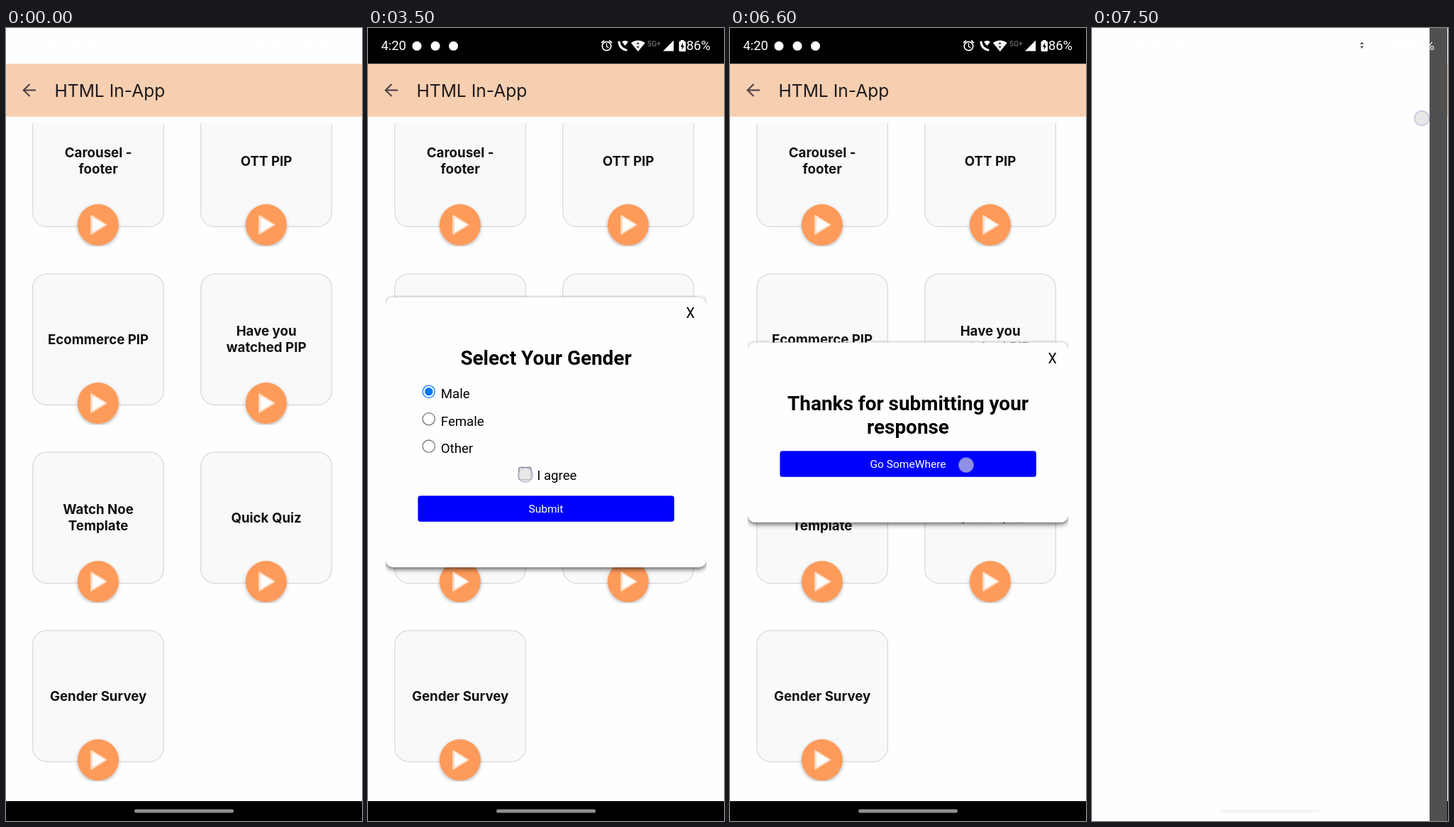
Write an HTML page with a canvas that moves like this. It is 502 by 1116 pixels and loops after 7.6 s.

```html
<!DOCTYPE html>
<html lang="en">
<head>
<meta charset="utf-8">
<title>HTML In-App</title>
<style>
html, body { margin: 0; width: 100%; height: 100%; overflow: hidden; background: #fefefe; }
canvas { display: block; width: 502px; height: 1116px; }
</style>
</head>
<body>
<canvas id="stage" width="502" height="1116"></canvas>
<script>
const ctx = document.getElementById('stage').getContext('2d');
const W = 502, H = 1116, LOOP = 7600, STEP = 100;
const PAPER = '#fefefe', ORANGE = '#fe9b5a', BLUE = '#0000fe', ACCENT = '#0075ff';
const UI = 'Inter, sans-serif', WEB = 'Roboto, sans-serif';

const cards = [
  ['Carousel -', 'footer'], ['OTT PIP'],
  ['Ecommerce PIP'], ['Have you', 'watched PIP'],
  ['Watch Noe', 'Template'], ['Quick Quiz'],
  ['Gender Survey']
];

// Each tap: start, end, x, y
const taps = [
  [400, 700, 129, 1031], [2400, 2700, 88, 514], [3400, 3800, 222, 629],
  [4800, 5000, 279, 684], [6600, 6800, 333, 615], [7500, 7600, 465, 127]
];

const between = (t, a, b) => t >= a && t < b;

function rect(x, y, w, h, color) {
  ctx.fillStyle = color;
  ctx.fillRect(x, y, w, h);
}

function round(x, y, w, h, r, fill, stroke, width = 1.3) {
  ctx.beginPath();
  ctx.roundRect(x, y, w, h, r);
  paint(fill, stroke, width);
}

function circle(x, y, r, fill, stroke, width = 1.3) {
  ctx.beginPath();
  ctx.arc(x, y, r, 0, Math.PI * 2);
  paint(fill, stroke, width);
}

function poly(points, fill, stroke, width, closed = true) {
  ctx.beginPath();
  points.forEach(([x, y]) => ctx.lineTo(x, y));
  if (closed) ctx.closePath();
  paint(fill, stroke, width);
}

function paint(fill, stroke, width) {
  if (fill) {
    ctx.fillStyle = fill;
    ctx.fill();
  }
  if (stroke) {
    ctx.strokeStyle = stroke;
    ctx.lineWidth = width;
    ctx.stroke();
  }
}

function text(value, x, y, font, color = '#000', align = 'left') {
  ctx.font = font;
  ctx.fillStyle = color;
  ctx.textAlign = align;
  ctx.fillText(value, x, y);
}

function shadow(color, blur, dy) {
  ctx.shadowColor = color;
  ctx.shadowBlur = blur;
  ctx.shadowOffsetY = dy;
}

function clipped(x, y, w, h, draw) {
  ctx.save();
  ctx.beginPath();
  ctx.rect(x, y, w, h);
  ctx.clip();
  draw();
  ctx.restore();
}

function playButton(x, y) {
  clipped(x - 34, y - 34, 68, 64.5, () => {
    shadow('rgba(0,0,0,.28)', 5, 2);
    circle(x, y, 29, ORANGE);
  });
  ctx.lineJoin = 'round';
  poly([[x - 9.5, y - 12.5], [x - 9.5, y + 12.5], [x + 11, y]], '#fddcc5', '#fddcc5', 2.6);
  poly([[x - 7.2, y - 9.8], [x - 7.2, y + 9.4], [x + 8.8, y - 0.2]], '#fff', '#fff', 1);
}

function card(lines, i) {
  const x = 37.7 + (i % 2) * 237, y = 94 + Math.floor(i / 2) * 251;
  const cx = x + 92.4;
  round(x, y + 0.9, 184.7, 184.6, 20, '#f9f9f9', '#dadada');
  lines.forEach((line, n) => {
    const offset = (n - (lines.length - 1) / 2) * 23;
    text(line, cx, y + 99.8 + offset, `700 18.7px ${UI}`, '#111', 'center');
  });
  playButton(cx - 0.2, y + 183);
}

function page(offset) {
  ctx.save();
  ctx.translate(offset, 0);
  rect(0, 0, W, H, PAPER);
  rect(0, 50.3, W, 74.5, '#f6cfb0');
  ctx.lineCap = 'butt';
  ctx.lineJoin = 'miter';
  poly([[33.5, 79], [24.8, 87.5], [33.5, 96]], null, '#51434a', 2.2, false);
  poly([[24.5, 87.5], [42, 87.5]], null, '#51434a', 2.2, false);
  text('HTML In-App', 68.5, 97.3, `400 24.6px ${UI}`, '#1f1a1d');
  clipped(0, 134, W, 954, () => cards.forEach(card));
  rect(0, 1088, W, 28, '#000');
  ctx.restore();
}

function wifi(x, y, r) {
  ctx.beginPath();
  ctx.moveTo(x, y);
  ctx.arc(x, y, r, -Math.PI * 0.72, -Math.PI * 0.28);
  ctx.closePath();
  paint('#fff');
}

function statusBar(t) {
  const dark = between(t, 800, 6900);
  const white = '#fff';
  if (dark) rect(0, 0, W, 50.3, '#000');
  text('4:20', 18.5, 31, `400 18.3px ${WEB}`, white);
  [69, 95, 120.5].forEach(x => circle(x, 25.3, 6.5, white));

  ctx.lineCap = 'round';
  circle(336.5, 25.5, 6.2, null, white, 1.7);
  poly([[336.5, 22], [336.5, 26], [339, 27.5]], null, white, 1.4, false);
  poly([[329.5, 20.5], [332.5, 18]], null, white, 1.7, false);
  poly([[340.5, 18], [343.5, 20.5]], null, white, 1.7, false);

  ctx.beginPath();
  ctx.moveTo(354, 20);
  ctx.quadraticCurveTo(355, 29, 364, 31);
  paint(null, white, 3.2);
  wifi(362.5, 25, 7);

  wifi(380.8, 33, 15.5);
  if (t >= 2300) {
    poly([[378, 23], [380.6, 19.5], [383.2, 23]], '#555');
    poly([[378, 25.5], [380.6, 29], [383.2, 25.5]], '#555');
  }
  text('5G+', 394, 25.5, `500 10.5px ${WEB}`, 'rgba(255,255,255,.42)');
  poly([[416, 32.5], [431, 17.5], [431, 32.5]], white);
  round(438.5, 18.5, 9.5, 14.5, 1.5, white);
  rect(441, 17, 4.5, 2.5, white);
  poly([[444, 20.5], [440.7, 26.5], [443, 26.5], [442.5, 31], [446, 25], [443.8, 25]], dark ? '#000' : PAPER);
  text('86%', 449, 31, `400 18.3px ${WEB}`, white);
}

function dialog(top, bottom) {
  clipped(25, top - 3, 452, bottom - top + 14, () => {
    ctx.save();
    shadow('rgba(0,0,0,.65)', 7, 2.5);
    round(25, top, 452, bottom - top, 10, PAPER);
    ctx.restore();
  });
  text('X', 454.7, top + 29.3, `400 19.5px ${WEB}`, '#000', 'center');
}

function heading(value, y) {
  text(value, 251, y, `700 27.9px ${WEB}`, '#000', 'center');
}

function button(label, y) {
  round(70.4, y + 0.3, 361.4, 36.4, 3.5, BLUE);
  text(label, 251, y + 23.5, `400 15.5px ${WEB}`, '#fff', 'center');
}

function survey(t) {
  dialog(379, 759);
  heading('Select Your Gender', 474.3);
  ['Male', 'Female', 'Other'].forEach((label, i) => {
    const y = 511.8 + i * 38.4, on = i === 0 && t >= 2500;
    circle(85.7, y, 8.6, '#fff', on ? ACCENT : '#767676');
    if (on) circle(85.7, y, 5.7, ACCENT);
    text(label, 102.8, y + 9.6, `400 18.6px ${WEB}`);
  });
  const agreed = t >= 3600;
  round(212.7, 618.3, 17.3, 17.3, 2.5, agreed ? ACCENT : '#fff', agreed ? ACCENT : '#767676');
  if (agreed) {
    ctx.lineCap = 'butt';
    ctx.lineJoin = 'miter';
    poly([[215.5, 627.3], [219.5, 631.2], [227.3, 622]], null, '#fff', 2.5, false);
  }
  text('I agree', 238.3, 636.3, `400 18.6px ${WEB}`);
  button('Submit', 658);
}

function thanks() {
  dialog(442.5, 695.7);
  heading('Thanks for submitting your', 537.7);
  heading('response', 570.7);
  button('Go SomeWhere', 595);
}

function touch(x, y) {
  circle(x, y, 10.3, 'rgba(220,220,220,.65)', 'rgba(150,150,210,.5)', 1.6);
}

// Slow start, fast middle, soft landing
function slide(t) {
  const p = Math.min(1, Math.max(0, (t - 7200) / 300));
  const rise = p ** 3.2, fall = (1 - p) ** 3.2;
  return 501 * rise / (rise + fall);
}

function render(t) {
  const offset = slide(t);
  rect(0, 0, W, H, PAPER);
  if (offset > 0) rect(offset - 25, 0, 25, H, '#505050');
  page(offset);
  statusBar(t);
  round(181, 1099.5, 140, 5, 2.5, 'rgba(240,240,240,.6)');
  if (between(t, 1000, 5000)) survey(t);
  if (between(t, 5000, 6800)) thanks();
  for (const [start, end, x, y] of taps) {
    if (between(t, start, end)) touch(x, y);
  }
}

const begin = performance.now();
function tick() {
  const t = (performance.now() - begin) % LOOP;
  render(Math.floor(t / STEP) * STEP);
  requestAnimationFrame(tick);
}
tick();
</script>
</body>
</html>
```
